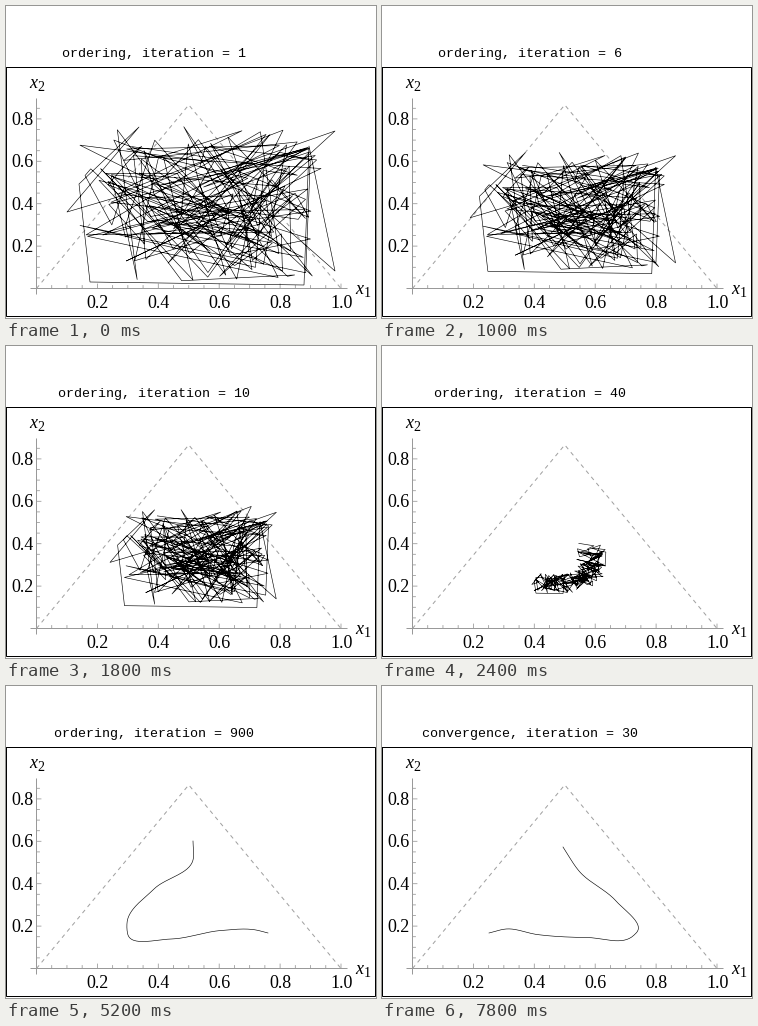
A matplotlib script that plays this animation: 370x312 px, repeating every 8 s.

```python
import numpy as np
import matplotlib.pyplot as plt
from matplotlib.animation import FuncAnimation

W, H, DPI = 370, 312, 100
PX = 72 / DPI                      # points per pixel
X0, Y0, SX, SY = 30.5, 282.5, 304.5, 212
UNITS = 180
GRAY = "#999999"

fig = plt.figure(figsize=(W / DPI, H / DPI), dpi=DPI, facecolor="white")
ax = fig.add_axes([0, 0, 1, 1])
ax.set_xlim(0, W)
ax.set_ylim(H, 0)
ax.axis("off")


def spline(*points):
    """Smooth curve through the points, sampled evenly by chord length."""
    p = np.array(points, float)
    s = np.r_[0, np.cumsum(np.hypot(*np.diff(p, axis=0).T))]
    slope = np.gradient(p, s, axis=0)
    u = np.linspace(0, s[-1], UNITS)
    k = np.clip(np.searchsorted(s, u, "right") - 1, 0, len(p) - 2)
    h = (s[k + 1] - s[k])[:, None]
    t = (u - s[k])[:, None] / h
    ease = t * t * (3 - 2 * t)
    return (p[k] * (1 - ease) + p[k + 1] * ease
            + h * t * (1 - t) * (slope[k] * (1 - t) - slope[k + 1] * t))


# Chain shapes in stage pixels
small = spline((148, 246), (185, 244), (213, 231), (218, 213), (211, 202))
wide = spline((70, 250), (150, 253), (228, 235), (215, 190), (189, 160))
left = spline((187, 155), (187, 174), (148, 203), (121, 237), (122, 249),
              (165, 253), (215, 244.5), (250, 244), (262, 247))
right = spline((107, 247), (124, 243), (155, 248.5), (205, 251.5),
               (251, 250), (255, 246), (234, 215), (197, 185), (181, 161))

KEYS = [17, 20, 26, 27, 39]
SHAPES = [small, wide, left, 0.98 * right + 0.02 * left, right]

# Random start weights, with one run around the rim
rng = np.random.default_rng(5)
start = np.column_stack([72 + 244 * rng.beta(1.3, 1.1, UNITS),
                         120 + 160 * rng.beta(1.1, 1.3, UNITS)])
rim = [(61, 206), (133, 121), (73, 178), (84, 276), (298, 279),
       (303, 140), (329, 265), (215, 165), (329, 125)]
start[20:20 + len(rim)] = rim
CENTER = np.array([182, 226])


def step_of(frame):
    """Phase name and iteration shown on a frame."""
    phase, k = ("ordering", frame) if frame < 28 else ("convergence", frame - 28)
    power, digit = divmod(k, 9)
    return phase, (digit + 1) * 10**power


def chain(frame):
    j = np.clip(np.searchsorted(KEYS, frame, "right") - 1, 0, len(KEYS) - 2)
    t = np.clip((frame - KEYS[j]) / (KEYS[j + 1] - KEYS[j]), 0, 1)
    goal = SHAPES[j] * (1 - t) + SHAPES[j + 1] * t
    phase, n = step_of(frame)
    if phase == "convergence":
        return goal
    goal = goal + (CENTER - goal) * np.exp((1 - n) / 20)
    return goal + (start - goal) * 0.948**(n - 1)


def line(xs, ys, color=GRAY, width=1.0, **kw):
    return ax.plot(xs, ys, color=color, lw=width * PX, snap=False, **kw)[0]


def label(x, y, s, size, family="Liberation Serif", **kw):
    return ax.text(x, y, s, fontsize=size * PX, family=family, **kw)


def draw_axes():
    line([0.5, 369.5, 369.5, 0.5, 0.5], [61.5, 61.5, 310.5, 310.5, 61.5],
         "black", solid_joinstyle="miter")
    line([25, 341], [Y0, Y0])
    line([X0, X0], [93, 288])
    for k in range(21):
        major = k % 4 == 0
        size = 4.5 if major else 3
        x, y = X0 + k * 0.05 * SX, Y0 - k * 0.05 * SY
        line([x, x], [Y0, Y0 - size], width=0.8)
        if k < 18:
            line([X0, X0 + size], [y, y], width=0.8)
        if major and k:
            label(x + 0.5, 302, f"{k / 20:.1f}", 18, ha="center")
            if k < 18:
                label(27.5, y + 6, f"{k / 20:.1f}", 18, ha="right")
    for x, y, sub in [(349.5, 288, "1"), (23, 82, "2")]:
        label(x, y, "x", 18, style="italic")
        label(x + 8, y + 3, sub, 14)
    line([X0, X0 + SX / 2, X0 + SX], [Y0, Y0 - 0.866 * SY, Y0], "#a0a0a0",
         dashes=(4, 4), dash_capstyle="butt")


draw_axes()
path = line([], [], "black", 0.6, solid_joinstyle="round", zorder=5)
title = label(148, 51, "", 13.33, "Liberation Mono", ha="center")


def update(frame):
    path.set_data(*chain(frame).T)
    title.set_text("{}, iteration = {}".format(*step_of(frame)))
    return path, title


anim = FuncAnimation(fig, update, frames=40, interval=200, repeat=True,
                     repeat_delay=0, init_func=lambda: update(0))
plt.show()
```
